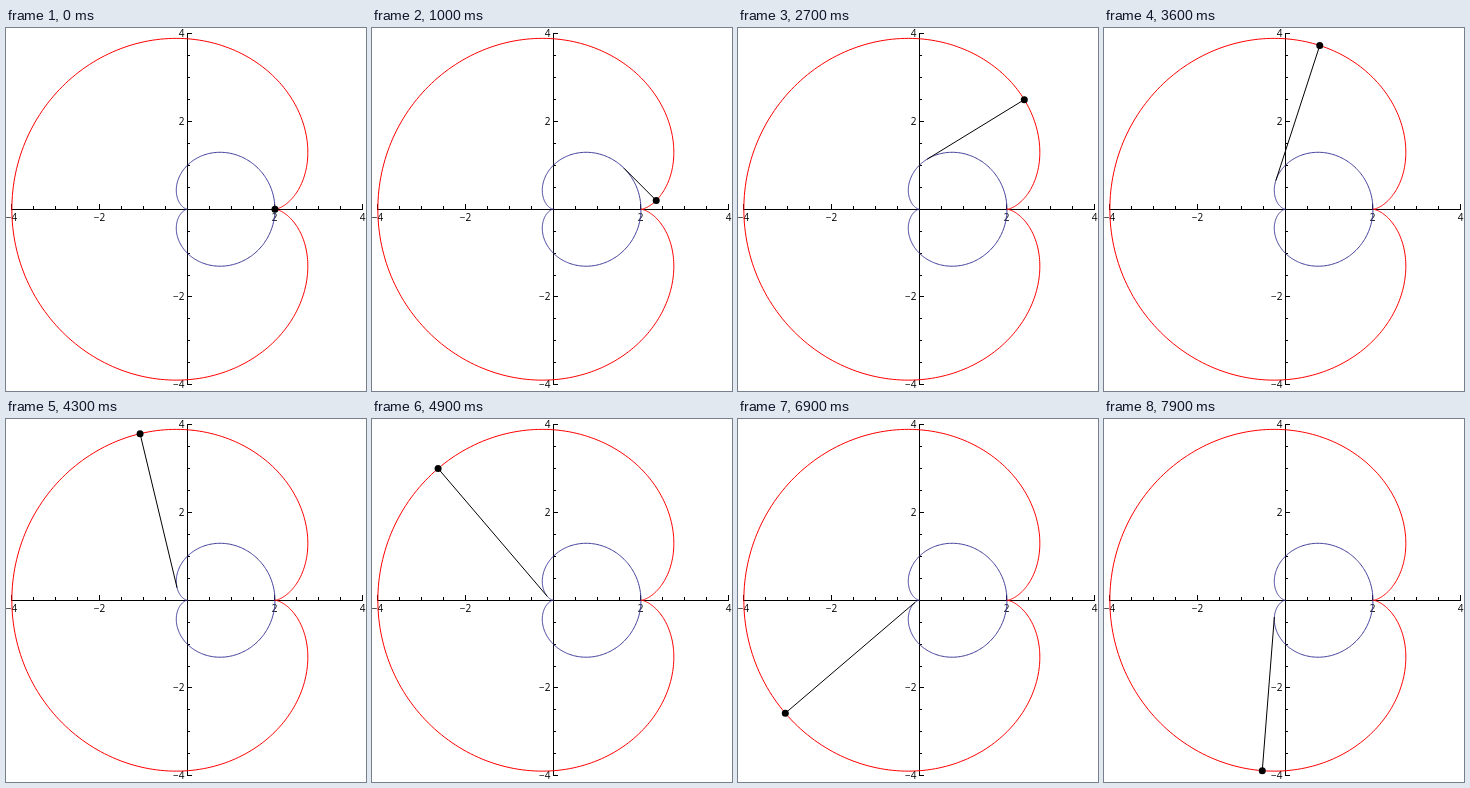
Recreate the animation shown at these times as an HTML page. Size 360 px wide and 363 px high, loop 8 s.

```html
<!DOCTYPE html>
<html lang="en">
<head>
<meta charset="utf-8">
<title>Involute of a cardioid</title>
<style>
  html, body { margin: 0; width: 100%; height: 100%; overflow: hidden; background: #fff; }
  svg { display: block; width: 100vw; height: 100vh; }
  path, line { fill: none; stroke: #000; }
  #axes { shape-rendering: crispEdges; }
  text { font: 10px "Open Sans", "Noto Sans", sans-serif; fill: #000; }
</style>
</head>
<body>
<svg viewBox="0 0 360 363">
  <path id="axes"/>
  <g id="labels"></g>
  <path id="cardioid" style="stroke:#3f3d99"/>
  <path id="involute" style="stroke:#f00"/>
  <line id="string"/>
  <circle id="dot" r="3.5"/>
</svg>
<script>
const ORIGIN = 181.25, UNIT = 43.85;
const STEP_MS = 100, STEPS = 80, STEPS_PER_TURN = 120;
const { sin, cos, PI } = Math;
const $ = id => document.getElementById(id);

const toStage = (x, y) => [ORIGIN + UNIT * x, ORIGIN - UNIT * y];
const cardioid = t => toStage((1 + cos(t)) * cos(t), (1 + cos(t)) * sin(t));
// The cardioid point moved back along its tangent by the arc length 4 sin(t/2).
const involute = t => toStage(0.5 + 3 * cos(t) - 1.5 * cos(2 * t), 3 * sin(t) - 1.5 * sin(2 * t));

function curvePath(curve, segments = 360) {
  const points = Array.from({ length: segments }, (_, i) =>
    curve(2 * PI * i / segments).map(v => v.toFixed(2)).join(","));
  return "M" + points.join("L") + "Z";
}

function addLabel(value, x, y, anchor) {
  const label = document.createElementNS("http://www.w3.org/2000/svg", "text");
  label.setAttribute("x", x);
  label.setAttribute("y", y);
  label.setAttribute("text-anchor", anchor);
  label.textContent = String(value).replace("-", "\u2212");
  $("labels").append(label);
}

function drawAxes() {
  let d = "M5 181.5H357M181.5 5V357";
  for (let v = -4; v <= 4; v += 0.5) {
    if (v === 0) continue;
    const major = v % 2 === 0;
    const length = major ? 5 : 3;
    const [x, y] = toStage(v, v).map(p => Math.floor(p) + 0.5);
    d += `M${x} 181v${-length}M182 ${y}h${length - 1}`;
    if (major) {
      addLabel(v, x, 193, "middle");
      addLabel(v, 178.5, y + 3.5, "end");
    }
  }
  $("axes").setAttribute("d", d);
}

function render(time) {
  const step = Math.floor(time / STEP_MS) % STEPS;
  const t = 2 * PI * step / STEPS_PER_TURN;
  const [x1, y1] = cardioid(t);
  const [x2, y2] = involute(t);
  const set = (id, attrs) => Object.entries(attrs).forEach(([k, v]) => $(id).setAttribute(k, v));
  set("string", { x1, y1, x2, y2 });
  set("dot", { cx: x2, cy: y2 });
}

drawAxes();
$("cardioid").setAttribute("d", curvePath(cardioid));
$("involute").setAttribute("d", curvePath(involute));

const start = performance.now();
function tick() {
  render(performance.now() - start);
  requestAnimationFrame(tick);
}
tick();
</script>
</body>
</html>
```
